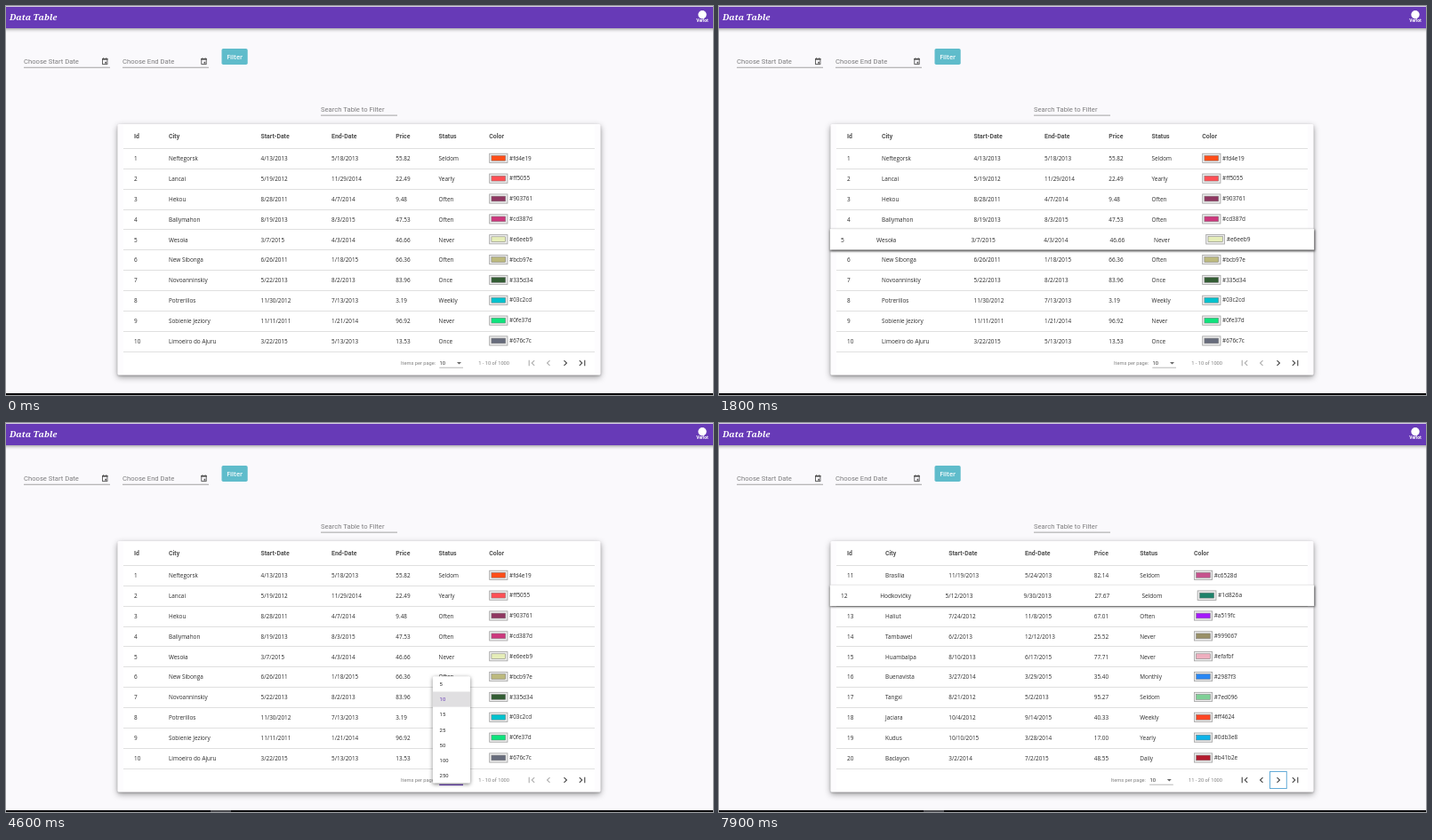
Animation, 795 px wide and 438 px high, one loop 8 s. Source, as an HTML page with a canvas:

```html
<!DOCTYPE html>
<html lang="en">
<head>
<meta charset="utf-8">
<title>Data Table</title>
<style>
html, body { margin: 0; width: 100%; height: 100%; overflow: hidden; background: #faf9fc; }
canvas { display: block; width: 795px; height: 438px; }
</style>
</head>
<body>
<canvas id="stage"></canvas>
<script>
const W = 795, H = 438, LOOP = 8000, STEP = 100;
const canvas = document.getElementById('stage');
const ctx = canvas.getContext('2d');
const dpr = window.devicePixelRatio || 1;
canvas.width = W * dpr;
canvas.height = H * dpr;

const CELL = '6.4px "Open Sans", "Noto Sans", sans-serif';
const roboto = (size, weight = 400) => `${weight} ${size}px Roboto, sans-serif`;
const PURPLE = '#673ab7', INK = '#2a2a2a', MUTED = 'rgba(0,0,0,.5)', LINE = '#e0e0e0';
const ROW_TOP = 160, ROW_H = 22.85, MID_X = 397, HOVER_SCALE = 1.0275;

const HEADS = ['Id', 'City', 'Start-Date', 'End-Date', 'Price', 'Status', 'Color'];
const parse = text => text.trim().split('\n').map(line => line.split('|'));

const pages = [
  {
    cols: [144, 183, 286.5, 366, 438.3, 486.6, 543.3],
    shift: 0,
    range: '1 - 10 of 1000',
    rows: parse(`
1|Neftegorsk|4/13/2013|5/18/2013|55.82|Seldom|#fd4e19
2|Lancai|5/19/2012|11/29/2014|22.49|Yearly|#ff5055
3|Hekou|8/28/2011|4/7/2014|9.48|Often|#903761
4|Ballymahon|8/19/2013|8/3/2015|47.53|Often|#cd387d
5|Wesoła|3/7/2015|4/3/2014|46.66|Never|#e6eeb9
6|New Sibonga|6/26/2011|1/18/2015|66.36|Often|#bcb97e
7|Novoanninskiy|5/22/2013|8/2/2013|83.96|Once|#335d34
8|Potrerillos|11/30/2012|7/13/2013|3.19|Weekly|#03c2cd
9|Sobienie Jeziory|11/11/2011|1/21/2014|96.92|Never|#0fe37d
10|Limoeiro do Ajuru|3/22/2015|5/13/2013|13.53|Once|#676c7c`)
  },
  {
    cols: [144, 187, 258.3, 344, 421.8, 473.3, 534],
    shift: -3.2,
    range: '11 - 20 of 1000',
    rows: parse(`
11|Brasília|11/19/2013|5/24/2013|82.14|Seldom|#c6528d
12|Hodkovičky|5/12/2013|9/30/2013|27.67|Seldom|#1d826a
13|Haliut|7/24/2012|11/8/2015|67.01|Often|#a519fc
14|Tambawel|6/2/2013|12/12/2013|25.52|Never|#999067
15|Huambalpa|8/10/2013|6/17/2015|77.71|Never|#efafbf
16|Buenavista|3/27/2014|3/29/2015|35.40|Monthly|#2987f3
17|Tangxi|8/21/2012|5/2/2013|95.27|Seldom|#7ed096
18|Jaciara|10/4/2012|9/14/2015|40.33|Weekly|#ff4624
19|Kudus|10/10/2015|3/28/2014|17.00|Yearly|#0db3e8
20|Baclayon|3/2/2014|7/2/2015|48.55|Daily|#b41b2e`)
  }
];

// [start time, hovered row index or -1]
const hovers = [
  [0, -1], [800, 0], [1200, 1], [1500, 2], [1600, 3], [1800, 4], [1900, 5], [2000, 6],
  [2200, 7], [2300, 8], [2700, -1],
  [7400, 9], [7500, 7], [7600, 5], [7700, 3], [7800, 2], [7900, 1]
];

const ICONS = {
  first: 'M18.41 16.59L13.82 12l4.59-4.59L17 6l-6 6 6 6zM6 6h2v12H6z',
  prev: 'M15.41 7.41L14 6l-6 6 6 6 1.41-1.41L10.83 12z',
  next: 'M10 6L8.59 7.41 13.17 12l-4.58 4.59L10 18l6-6z',
  last: 'M5.59 7.41L10.18 12l-4.59 4.59L7 18l6-6-6-6zM16 6h2v12h-2z'
};
for (const key in ICONS) ICONS[key] = new Path2D(ICONS[key]);

const ramp = (t, from, to) => Math.min(1, Math.max(0, (t - from) / (to - from)));

function rect(x, y, w, h, fill) {
  ctx.fillStyle = fill;
  ctx.fillRect(x, y, w, h);
}

function rounded(x, y, w, h, r, fill) {
  ctx.fillStyle = fill;
  ctx.beginPath();
  ctx.roundRect(x, y, w, h, r);
  ctx.fill();
}

function disc(x, y, r, fill) {
  ctx.fillStyle = fill;
  ctx.beginPath();
  ctx.arc(x, y, r, 0, Math.PI * 2);
  ctx.fill();
}

function text(str, x, y, font, fill, align = 'left') {
  ctx.font = font;
  ctx.fillStyle = fill;
  ctx.textAlign = align;
  ctx.fillText(str, x, y);
}

function withShadow(color, blur, dx, dy, draw) {
  ctx.save();
  ctx.shadowColor = color;
  ctx.shadowBlur = blur * dpr;
  ctx.shadowOffsetX = dx * dpr;
  ctx.shadowOffsetY = dy * dpr;
  draw();
  ctx.restore();
}

function drawToolbar() {
  withShadow('rgba(0,0,0,.45)', 4, 0, 1, () => rect(-5, 0, W + 10, 25, PURPLE));
  rect(0, 0, W, 1, '#d6d0e2');
  text('Data Table', 4, 16.4, 'italic 900 9.6px "Noto Serif", serif', '#fff');
  disc(783, 9.8, 4.7, '#fff');
  text('Verlot', 783, 18.4, roboto(5, 700), '#fff', 'center');
}

function drawCalendar(x) {
  ctx.strokeStyle = '#555';
  ctx.lineWidth = 0.9;
  ctx.strokeRect(x + 0.5, 59.5, 5.4, 6);
  rect(x, 59, 6.4, 1.7, '#555');
  rect(x + 1.2, 58.2, 0.9, 1, '#555');
  rect(x + 4.3, 58.2, 0.9, 1, '#555');
  rect(x + 3.2, 62.8, 1.8, 1.8, '#555');
}

function drawField(label, x, y, width) {
  text(label, x, y, roboto(7.65), MUTED);
  rect(x, y + 4.2, width, 0.8, '#8e8e8e');
}

function drawFilters() {
  drawField('Choose Start Date', 20, 64.6, 97);
  drawField('Choose End Date', 131, 64.6, 97);
  drawCalendar(108);
  drawCalendar(219.3);
  rounded(242.5, 48, 29.2, 18, 1.8, '#5fbccb');
  text('Filter', 257.2, 59.8, '600 7.2px "Open Sans", sans-serif', '#fff', 'center');
  drawField('Search Table to Filter', 354, 118.5, 86);
}

function drawSwatch(x, mid, color) {
  ctx.lineWidth = 0.8;
  ctx.strokeStyle = '#a2a2a2';
  rect(x, mid - 5.5, 21, 11, '#efefef');
  ctx.strokeRect(x + 0.4, mid - 5.1, 20.2, 10.2);
  ctx.strokeStyle = '#777';
  rect(x + 2.6, mid - 2.9, 15.8, 5.8, color);
  ctx.lineWidth = 0.5;
  ctx.strokeRect(x + 2.6, mid - 2.9, 15.8, 5.8);
}

function drawCells(page, i) {
  const mid = ROW_TOP + (i + 0.5) * ROW_H;
  const { cols, rows } = page;
  rows[i].forEach((value, c) => {
    if (c < 6) return text(value, cols[c], mid + 2.7, CELL, INK);
    drawSwatch(cols[c], mid - 0.1, value);
    text(value, cols[c] + 22.7, mid + 2.1, CELL, INK);
  });
}

function drawHoverRow(page, i) {
  const top = ROW_TOP + i * ROW_H, mid = top + ROW_H / 2;
  ctx.save();
  ctx.translate(MID_X, mid);
  ctx.scale(HOVER_SCALE, HOVER_SCALE);
  ctx.translate(-MID_X, -mid);
  withShadow('rgba(0,0,0,.8)', 2.5, 0.7, 1, () => rect(132, top, 530, ROW_H, '#fff'));
  drawCells(page, i);
  ctx.restore();
}

function drawTable(page, hover) {
  withShadow('rgba(0,0,0,.38)', 7, 0, 2.5, () => rounded(125.5, 133, 543, 282.5, 1.5, '#fdfcfe'));
  withShadow('rgba(0,0,0,.25)', 2, 0, 1, () => rounded(125.5, 133, 543, 282.5, 1.5, '#fdfcfe'));
  rect(132, 133.5, 530, 281.5, '#fff');
  HEADS.forEach((head, c) => text(head, page.cols[c], 148.6, roboto(6.9, 700), '#505050'));
  for (let i = 0; i <= 10; i++) rect(132, Math.round(ROW_TOP + i * ROW_H), 530, 1, LINE);
  page.rows.forEach((row, i) => { if (i !== hover) drawCells(page, i); });
  if (hover >= 0) drawHoverRow(page, hover);
}

function drawIcon(name, x, enabled) {
  ctx.save();
  ctx.translate(x, 402);
  ctx.scale(0.5577, 0.5577);
  ctx.translate(-12, -12);
  ctx.fillStyle = enabled ? '#444' : '#adadad';
  ctx.fill(ICONS[name]);
  ctx.restore();
}

function drawPaginator(page, t) {
  const s = page.shift, onSecond = page === pages[1];
  text('Items per page:', 444 + s, 404.1, roboto(5.7), MUTED);
  text('10', 487.6 + s, 404.1, roboto(5.8), INK);
  rect(487.3 + s, 406.8, 26.7, 0.7, '#999');
  ctx.fillStyle = '#666';
  ctx.beginPath();
  ctx.moveTo(507 + s, 401);
  ctx.lineTo(512 + s, 401);
  ctx.lineTo(509.5 + s, 403.6);
  ctx.fill();
  text(page.range, 566, 404.1, roboto(5.7), MUTED, 'right');

  const ripple = ramp(t, 6700, 6900) * (1 - ramp(t, 7200, 7400));
  if (ripple) disc(629, 402, 5 + 3 * ripple, `rgba(0,0,0,${0.17 * ripple})`);
  drawIcon('first', 591, onSecond);
  drawIcon('prev', 610, onSecond);
  drawIcon('next', 629, true);
  drawIcon('last', 648, true);
  if (t >= 6800) {
    ctx.strokeStyle = '#64acd8';
    ctx.lineWidth = 1;
    ctx.strokeRect(619.5, 392.5, 18.8, 19);
  }
}

function drawMenu(t) {
  const line = ramp(t, 4200, 4500) * (1 - ramp(t, 6400, 6600));
  if (line) rect(500.6 - 13.4 * line, 406.8, 26.8 * line, 1.3, PURPLE);
  const open = ramp(t, 4200, 4400) * (1 - ramp(t, 6300, 6500));
  if (!open) return;
  ctx.save();
  ctx.globalAlpha = open;
  if (t < 5000) {
    ctx.translate(0, 311);
    ctx.scale(1, 0.8 + 0.2 * open);
    ctx.translate(0, -311);
  }
  withShadow('rgba(0,0,0,.5)', 4, 0, 1.2, () => rounded(479.8, 285.3, 42.2, 120.3, 1.5, '#fff'));
  rect(479.8, 302.5, 42.2, 17.15, '#e0dfe1');
  [5, 10, 15, 25, 50, 100, 250].forEach((size, i) =>
    text(size, 487.6, 296 + i * 17.17, roboto(5.9), size === 10 ? PURPLE : INK));
  ctx.restore();
}

function drawTooltip(t) {
  const shown = ramp(t, 6600, 6800) * (1 - ramp(t, 7200, 7400));
  if (!shown) return;
  ctx.save();
  ctx.globalAlpha = shown;
  ctx.translate(629, 379.5);
  ctx.scale(shown, shown);
  rounded(-15, -6.3, 30, 12.6, 1.2, '#616161');
  text('Next page', 0, 1.8, roboto(4.85, 500), '#fff', 'center');
  ctx.restore();
}

function draw(t) {
  const page = pages[t < 7200 ? 0 : 1];
  const hover = hovers.filter(([start]) => t >= start).pop()[1];
  ctx.setTransform(dpr, 0, 0, dpr, 0, 0);
  rect(0, 0, W, H, '#faf9fc');
  drawToolbar();
  drawFilters();
  drawTable(page, hover);
  drawPaginator(page, t);
  drawMenu(t);
  drawTooltip(t);
  rect(0, 436, W, 2, '#08070c');
  if (t >= 4100) rect(230, 436, 23, 2, '#4a4a4e');
}

const start = performance.now();
function tick() {
  const t = (performance.now() - start) % LOOP;
  draw(Math.floor(t / STEP) * STEP);
  requestAnimationFrame(tick);
}
tick();
</script>
</body>
</html>
```
